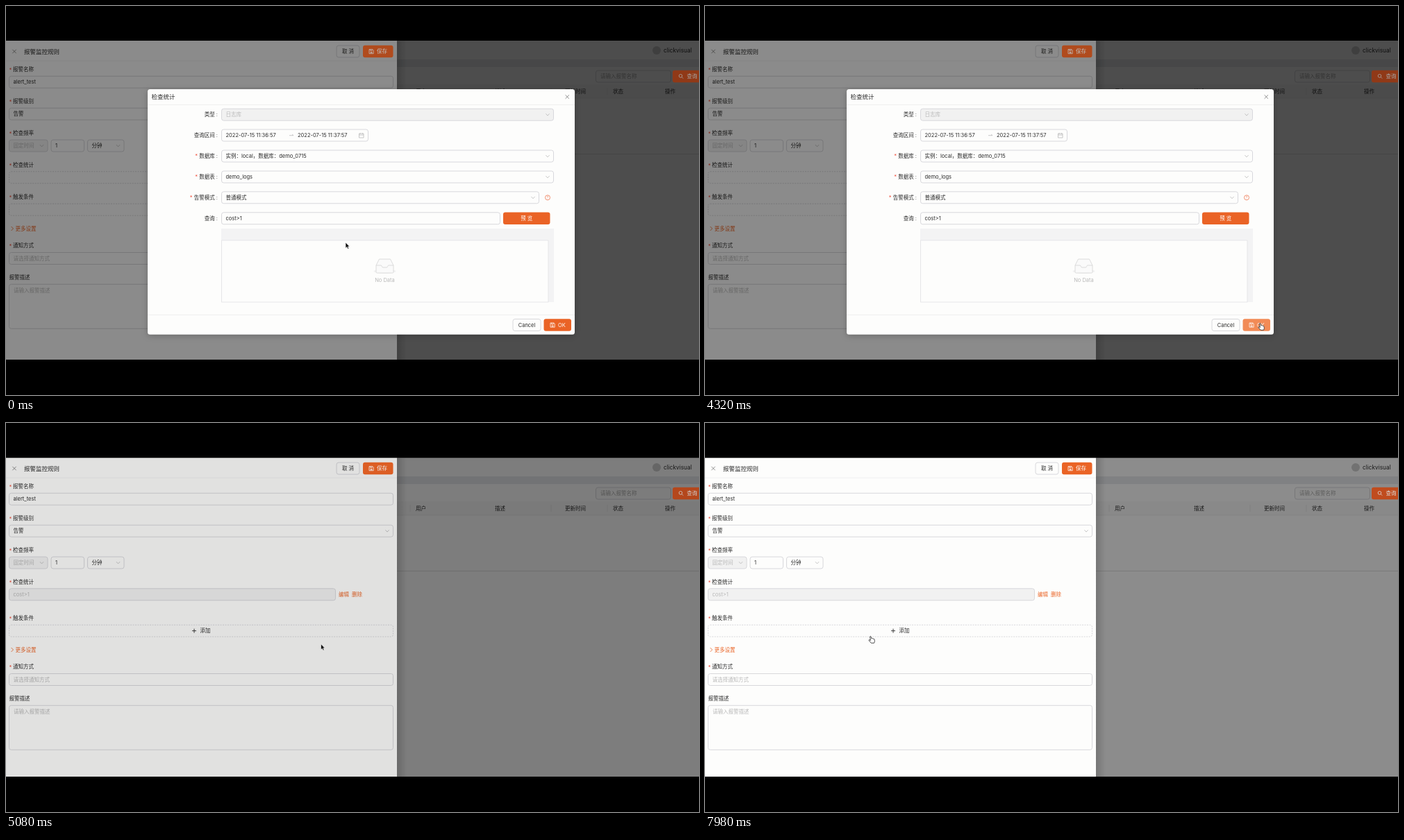
An HTML page that plays this animation: 998x561 px, repeating every 8 s.

```html
<!DOCTYPE html>
<html lang="zh-CN">
<head>
<meta charset="utf-8">
<title>报警监控规则</title>
<style>
  html, body { margin: 0; width: 100%; height: 100%; overflow: hidden; background: #000; }
  svg { display: block; width: 100vw; height: 100vh; }
  text { font-family: Inter, "Noto Sans CJK SC", "Noto Sans CJK", sans-serif; white-space: pre; }
</style>
</head>
<body>
<svg id="stage" viewBox="0 0 998 561" preserveAspectRatio="none"></svg>
<script>
const ORANGE = '#ea6426', HOVER = '#f28b57', INK = '#2b2b2b', PALE = '#b9b9b9', LINE = '#d4d4d8', WHITE = '#fdfdfc';
const LOOP = 8000, CLOSE_START = 4627, CLOSE_TIME = 600;
const TOP = 50.5, HEIGHT = 459.5;

// Drawing helpers; every y of a text is its vertical centre.
const text = (x, y, s, { fill = INK, size = 7.5, weight = 400, anchor = 'start' } = {}) =>
  `<text x="${x}" y="${y + size * .36}" font-size="${size}" font-weight="${weight}" fill="${fill}" text-anchor="${anchor}">${s}</text>`;
const rect = (x, y, w, h, fill, extra = '') => `<rect x="${x}" y="${y}" width="${w}" height="${h}" fill="${fill}" ${extra}/>`;
const path = (d, stroke = PALE, width = .8, fill = 'none') =>
  `<path d="${d}" stroke="${stroke}" stroke-width="${width}" fill="${fill}"/>`;
const group = (id, body, extra = '') => `<g id="${id}" ${extra}>${body}</g>`;
const line = (x1, x2, y, color = '#ececec') => path(`M${x1} ${y}H${x2}`, color);

const box = (x1, x2, y, { fill = WHITE, h = 17, dash = false, stroke = LINE } = {}) =>
  rect(x1 + .5, y - 8.5, x2 - x1 - 1, h, fill, `rx="3" stroke="${stroke}" stroke-width=".9" ${dash ? 'stroke-dasharray="2 1.5"' : ''}`);
const chevron = (x, y) => path(`M${x - 2.6} ${y - 1.4}l2.6 2.8 2.6-2.8`);
const cross = (x, y) => path(`M${x - 2.7} ${y - 2.7}l5.4 5.4m0-5.4l-5.4 5.4`, '#777');
const field = (x1, x2, y, value, { disabled = false, hint = false, select = false } = {}) =>
  box(x1, x2, y, { fill: disabled ? '#f1f1f1' : WHITE }) +
  text(x1 + 6.5, y, value, { fill: disabled || hint ? PALE : INK }) + (select ? chevron(x2 - 9, y) : '');
const saveIcon = (x, y) => path(`M${x - 3} ${y - 3}h5l1.2 1.2v5h-6.2zM${x - 1.3} ${y - 3}v2h2.5v-2M${x - 1} ${y + 1}h2.2v1.2h-2.2z`, '#fff', .75);
const button = (x1, x2, y, fill) => rect(x1, y - 8.7, x2 - x1, 17.4, fill, 'rx="3"');
const label = (y, s, required = true) =>
  (required ? text(4.5, y + .8, '*', { fill: '#f0503c' }) : '') + text(required ? 10 : 4.5, y, s);

function page() {
  const heads = [[590, '用户'], [704, '描述'], [805, '更新时间'], [874, '状态'], [949, '操作']];
  return rect(0, TOP, 998, HEIGHT, '#fff') + rect(563, 77, 435, 11, '#e9ebee') +
    `<circle cx="937" cy="64" r="6" fill="#cfcfcf"/>` + text(947, 64.2, 'clickvisual', { size: 8.3 }) +
    box(849, 958, 101.5) + text(856, 101.5, '请输入报警名称', { fill: '#a8a8a8' }) +
    rect(563, 113, 435, 20, '#f8f8f8') + line(563, 998, 133) + line(563, 998, 213.5, '#d8d8d8') +
    heads.map(([x, s]) => text(x, 123, s, { weight: 500 })).join('') +
    [582, 785, 866].map(x => path(`M${x} 118v10`, '#e4e4e4')).join('');
}

const addButton = y => box(4, 558, y, { dash: true }) + path(`M268 ${y}h6m-3-3v6`, INK, .9) + text(279.5, y, '添加');

function drawer() {
  const top = cross(12, 65.5) + text(26, 65.5, '报警监控规则', { size: 8.5, weight: 500 }) +
    box(475.5, 509.5, 65.5) + text(492.5, 65.5, '取 消', { anchor: 'middle' }) + line(0, 563, 79) +
    label(91, '报警名称') + field(4, 558, 109.7, 'alert_test') +
    label(137, '报警级别') + field(4, 558, 155.7, '告警', { select: true }) +
    label(183, '检查频率') + field(4, 60.5, 201.5, '固定时间', { select: true, disabled: true }) +
    field(64.5, 113, 201.5, '1') + field(117, 170.5, 201.5, '分钟', { select: true }) + label(229, '检查统计');
  const query = field(4, 475, 247.3, 'cost&gt;1', { disabled: true }) +
    text(479, 247.3, '编辑', { fill: ORANGE }) + text(498, 247.3, '删除', { fill: ORANGE });
  const lower = label(275, '触发条件') + addButton(293.7) +
    path('M7.5 318l3 3-3 3', ORANGE) + text(13.5, 321, '更多设置', { fill: ORANGE }) +
    label(345, '通知方式') + field(4, 558, 364, '请选择通知方式', { hint: true }) +
    label(391, '报警描述', false) + box(4, 558, 409.8, { h: 64 }) + text(11, 410, '请输入报警描述', { fill: PALE });
  return rect(563, TOP, 14, HEIGHT, 'url(#edge)') + rect(0, TOP, 563, HEIGHT, WHITE) + top +
    group('addQuery', addButton(247.3)) + group('query', query) + group('lower', lower);
}

const modalLabel = (y, s, required) => text(305, y, (required ? '<tspan fill="#f0503c">* </tspan>' : '') + s + ' :', { anchor: 'end' });

function modalFrame(height, okButton) {
  const foot = 120 + height - 13.7;
  return rect(204, 120, 615, height, WHITE, 'rx="3.5"') +
    text(209.5, 131, '检查统计', { size: 8.5, weight: 500 }) + cross(808.3, 131) +
    line(204, 819, 142.5) + line(204, 819, foot - 14.5) +
    box(729.5, 770.5, foot) + text(750, foot, 'Cancel', { anchor: 'middle' }) +
    okButton(foot) + saveIcon(787, foot) + text(795, foot, 'OK', { fill: '#fff' });
}

function commonRows(from, to) {
  return modalLabel(156.7, '类型') + field(310, 789, 156.7, '日志库', { select: true, disabled: true }) +
    modalLabel(186.5, '查询区间') + box(310, 522, 186.5) +
    text(316.5, 186.5, from) + text(420, 186.5, to) +
    path('M408 186.7h6m-1.8-1.6l1.8 1.6') +
    path('M508.5 184h6.5v6h-6.5zm0 2h6.5m-5-3v1.6m3.4-1.6v1.6') + modalLabel(216.5, '数据库', true);
}

const modeRow = (y, value) => modalLabel(y, '告警模式', true) + field(310, 768, y, value, { select: true }) +
  `<circle cx="780" cy="${y}" r="3.5" fill="none" stroke="#ee7550" stroke-width=".8"/>` +
  text(780, y, '?', { fill: '#ee7550', size: 5, anchor: 'middle' });

function filledModal() {
  const empty = '<ellipse cx="545.5" cy="382.5" rx="16" ry="3.2" fill="#f2f2f2"/>' +
    path('M533 374l4.5-9h16l4.5 9v9.5q0 1.5-1.5 1.5h-22q-1.5 0-1.5-1.5z', '#d4d4d4', .8, '#fafafa') +
    path('M533 374h7q1 0 1.3 1.5t1.7 1.5h5q1.4 0 1.7-1.5t1.3-1.5h7', '#d4d4d4');
  const okButton = y => group('ok', button(774.5, 814, y, 'currentColor'));
  return modalFrame(353.7, okButton) + commonRows('2022-07-15 11:36:57', '2022-07-15 11:37:57') +
    field(310, 789, 216.5, '实例：local，数据库：demo_0715', { select: true }) +
    modalLabel(246.5, '数据表', true) + field(310, 789, 246.5, 'demo_logs', { select: true }) +
    modeRow(276.3, '普通模式') +
    modalLabel(306.3, '查询') + field(310, 712, 306.3, 'cost&gt;1') +
    button(716, 783.5, 306.3, ORANGE) + text(749.8, 306.3, '预 览', { fill: '#fff', anchor: 'middle' }) +
    rect(310, 321, 479, 106, '#f3f3f4') + rect(310.5, 338, 470.5, 89, WHITE, 'stroke="#e2e2e4" stroke-width=".8"') +
    empty + text(545.5, 395.5, 'No Data', { fill: PALE, anchor: 'middle' });
}

function resetModal() {
  return modalFrame(182, y => button(774.5, 814, y, HOVER)) + commonRows('2022-07-15 11:44:34', '2022-07-15 11:45:34') +
    field(310, 789, 216.5, '请选择数据库', { select: true, hint: true }) + modeRow(246.5, '');
}

const arrow = path('M0 0V8.3L1.9 6.5L3.2 9.3L4.7 8.6L3.4 5.9H5.8Z', '#fff', .6, '#111');
const hand = path('M-1.5 0Q-.7-1 0 0L.8 2.8Q1.6 2.2 2.2 2.9Q3 2.5 3.5 3.2Q4.5 2.9 4.9 4L5.3 6.5Q5.3 8 4.5 9.3H.3L-2.5 6.2Q-3.6 4.6-2.5 4.5L-.6 5.5Z', '#222', .8, '#fff');

document.getElementById('stage').innerHTML =
  '<defs><filter id="shadow" x="-10%" y="-10%" width="120%" height="120%"><feDropShadow dx="0" dy="2" stdDeviation="5" flood-opacity=".22"/></filter>' +
  '<linearGradient id="edge"><stop stop-opacity=".16"/><stop offset="1" stop-opacity="0"/></linearGradient></defs>' +
  rect(0, 0, 998, 561, '#000') + page() + rect(0, TOP, 998, HEIGHT, '#000', 'opacity=".45"') +
  drawer() + rect(0, TOP, 998, HEIGHT, '#000', 'id="mask"') +
  group('actions',
    button(960, 1004, 101.5, '#c04c1e') +
    '<circle cx="971.5" cy="100.8" r="2.3" fill="none" stroke="#ddd" stroke-width=".8"/>' +
    path('M973.2 102.5l2 2', '#ddd') + text(980.5, 101.5, '查询', { fill: '#ddd' }) +
    button(514, 557.5, 65.5, ORANGE) + saveIcon(526, 65.5) + text(534, 65.5, '保存', { fill: '#fff' })) +
  group('filled', filledModal(), 'filter="url(#shadow)"') + group('reset', resetModal(), 'filter="url(#shadow)"') +
  group('arrow', arrow) + group('hand', hand);

const el = id => document.getElementById(id);
const set = (id, name, value) => el(id).setAttribute(name, value);
const show = (id, on) => set(id, 'display', on ? 'inline' : 'none');
const clamp = v => Math.min(1, Math.max(0, v));

// Pointer stops: time, x, y.
const stops = [[0, 489, 341], [1660, 489, 341], [2260, 772, 441], [2500, 800, 458], [4580, 800, 458], [4800, 774, 453],
  [5080, 454, 319], [5800, 93, 161], [6900, 93, 161], [7800, 239, 308], [LOOP, 239, 308]];
const handTimes = [[2400, 4620], [5780, 6930], [7700, LOOP]];

function pointerAt(t) {
  const i = stops.findIndex(s => s[0] > t);
  const [t0, x0, y0] = stops[i - 1], [t1, x1, y1] = stops[i];
  const k = (t - t0) / (t1 - t0);
  return `translate(${x0 + (x1 - x0) * k} ${y0 + (y1 - y0) * k})`;
}

// Circular ease in and out.
const easeCirc = p => p < .5 ? (1 - Math.sqrt(1 - 4 * p * p)) / 2 : (1 + Math.sqrt(1 - 4 * (1 - p) ** 2)) / 2;

function draw(t) {
  const closing = t >= CLOSE_START, p = clamp((t - CLOSE_START) / CLOSE_TIME);
  const dim = .45 * (1 - p), fade = clamp(p / .75), scale = 1 - .8 * easeCirc(p);
  set('mask', 'opacity', dim);
  el('actions').style.filter = `brightness(${1 - .55 * dim})`;
  show('addQuery', !closing);
  show('query', closing);
  set('lower', 'transform', `translate(0 ${closing ? 6 : 0})`);
  show('filled', !closing);
  show('reset', closing && fade < 1);
  set('reset', 'transform', `translate(90 235) scale(${scale}) translate(-90 -149)`);
  set('reset', 'opacity', 1 - fade * fade);
  set('ok', 'color', t >= 2400 ? HOVER : ORANGE);
  const overLink = handTimes.some(([a, b]) => t >= a && t < b);
  show('hand', overLink);
  show('arrow', !overLink);
  set(overLink ? 'hand' : 'arrow', 'transform', pointerAt(t));
}

function tick(now) {
  draw(now % LOOP);
  requestAnimationFrame(tick);
}
draw(0);
requestAnimationFrame(tick);
</script>
</body>
</html>
```
